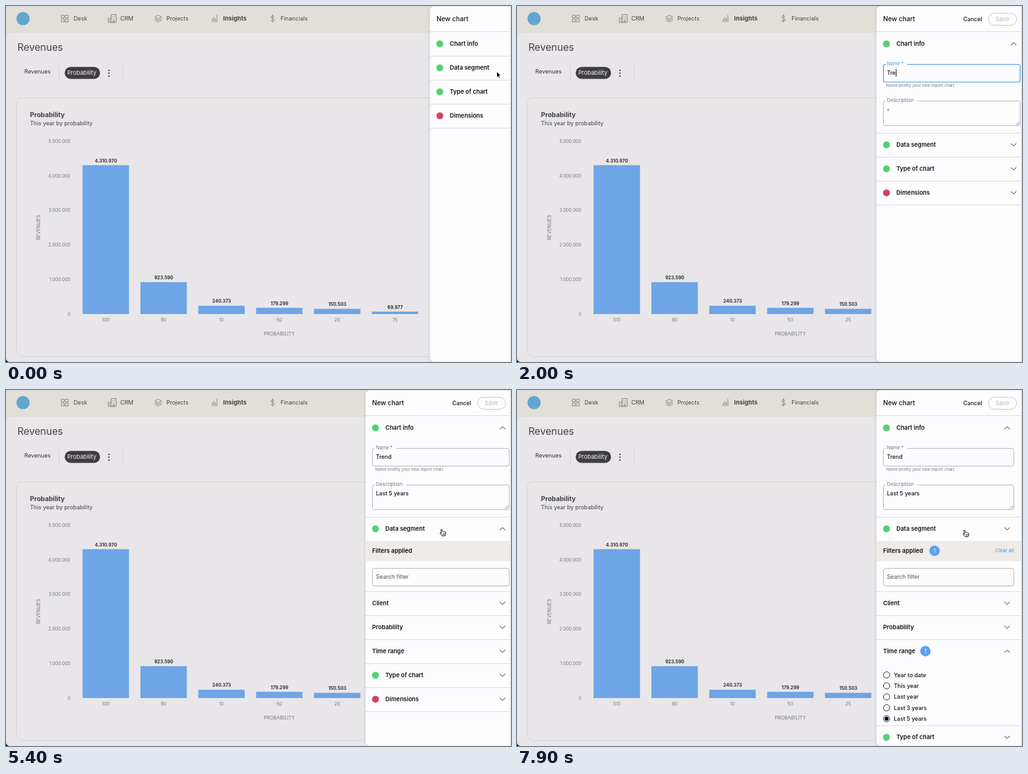
An HTML page with a canvas for the animation above (8 s loop, 800x564 px).

```html
<!DOCTYPE html>
<html lang="en">
<head>
<meta charset="utf-8">
<title>New chart</title>
<style>
  html, body { margin: 0; width: 100%; height: 100%; overflow: hidden; background: #e8e6e8; }
  canvas { display: block; }
</style>
</head>
<body>
<canvas id="stage" width="800" height="564"></canvas>
<script>
const ctx = document.getElementById('stage').getContext('2d');
const LOOP = 8000, TICK = 100;
const INK = '#111013', GREY = '#77757a', LINE = '#dddbdf', FIELD = '#b5b3b8';
const BLUE = '#3b9be8', BADGE = '#5f9fee', GREEN = '#52d272', RED = '#d2435f', PAPER = '#fdfcfe';

const clamp = v => Math.max(0, Math.min(1, v));
const ease = u => u < .5 ? 4 * u ** 3 : 1 - (2 - 2 * u) ** 3 / 2;
const tween = (t, start, length) => ease(clamp((t - start) / length));
const typed = (text, t, start, step) => text.slice(0, Math.max(0, Math.floor((t - start) / step) + 1));

// ---------- drawing helpers ----------
function text(str, x, y, size, { color = INK, weight = 400, align = 'left' } = {}) {
  ctx.font = `${weight} ${size}px Inter, sans-serif`;
  ctx.textAlign = align;
  ctx.fillStyle = color;
  ctx.fillText(str, x, y + size * .36);
}

function rect(x, y, w, h, color) {
  ctx.fillStyle = color;
  ctx.fillRect(x, y, w, h);
}

function rounded(x, y, w, h, r, { fill, stroke, width = 1 }) {
  ctx.beginPath();
  ctx.roundRect(x, y, w, h, r);
  paint(fill, stroke, width);
}

function circle(x, y, r, { fill, stroke, width = 1 }) {
  ctx.beginPath();
  ctx.arc(x, y, r, 0, 7);
  paint(fill, stroke, width);
}

function shape(d, x, y, { fill, stroke, width = 1 }) {
  const path = new Path2D(d);
  ctx.save();
  ctx.translate(x, y);
  ctx.lineJoin = ctx.lineCap = 'round';
  paint(fill, stroke, width, path);
  ctx.restore();
}

function paint(fill, stroke, width, path) {
  const args = path ? [path] : [];
  if (fill) { ctx.fillStyle = fill; ctx.fill(...args); }
  if (stroke) { ctx.strokeStyle = stroke; ctx.lineWidth = width; ctx.stroke(...args); }
}

// ---------- dimmed page ----------
const NAV = [
  ['Desk', 107, 88, 'M0 0h4.3v4.3h-4.3z M6.4 0h4.3v4.3h-4.3z M0 6.4h4.3v4.3h-4.3z M6.4 6.4h4.3v4.3h-4.3z'],
  ['CRM', 181, 162, 'M0 11.5V4.5H4.5V11.5 M4.5 11.5V-1H12.5V11.5H0 M2 7h.8 M2 9.2h.8 M7 2h.5 M9.7 2h.5 M7 4.8h.5 M9.7 4.8h.5 M7.5 11.5V8.2h2.2v3.3'],
  ['Projects', 254, 236, 'M0 2.8L5.3 0L10.6 2.8L5.3 5.6Z M0 5.4L5.3 8.2L10.6 5.4 M0 8L5.3 10.8L10.6 8'],
  ['Insights', 344, 326, 'M.8 10.5V6 M3.2 10.5V3.5 M5.6 10.5V5 M8 10.5V0'],
  ['Financials', 435, 419, 'M5.7 2.5C5.4 .5 .8 .5 .8 3C.8 5.8 5.9 4.6 5.9 7.6C5.9 10.2 .7 10.1 .4 7.9 M3.3 -.8V11.5']
];
const BARS = [[4310970, '100'], [923590, '90'], [240373, '10'], [179299, '50'], [150503, '25'], [69977, '75']];
const dotted = n => String(n).replace(/\B(?=(\d{3})+$)/g, '.');

function drawPage() {
  rect(0, 0, 800, 564, '#e2dfd9');
  rounded(-.5, 41.5, 820, 540, 8, { fill: '#e8e6e8', stroke: '#dcd9d7' });
  circle(27, 20, 10.5, { fill: '#62a5cd' });
  for (const [label, x, iconX, icon] of NAV) {
    const active = label === 'Insights';
    shape(icon, iconX, 14.5, { stroke: '#7d7b7d', width: .9 });
    text(label, x, 19.5, active ? 9.5 : 9.15, { color: '#454346', weight: active ? 700 : 400 });
  }

  text('Revenues', 18, 65.2, 15.7, { color: '#454347' });
  text('Revenues', 29, 104, 9.05, { color: '#333135' });
  rect(84, 93, 1, 25, '#d5d3d5');
  rounded(93, 96.5, 56, 19, 9.5, { fill: '#3f3d41' });
  text('Probability', 97, 105.5, 9.2, { color: '#f3f1f3' });
  for (const y of [102, 106.5, 111]) circle(163, y, 1.2, { fill: '#49474b' });
  rect(185, 93, 1, 25, '#d5d3d5');

  rounded(16.5, 145.5, 800, 410, 8, { stroke: '#d7d5d8' });
  text('Probability', 38, 172, 10.4, { color: '#434145', weight: 700 });
  text('This year by probability', 38, 186, 8.95, { color: '#434145' });
  drawChart();
  shape('M0 -6V0H6C2.5 0 0 -2.5 0 -6', 0, 564, { fill: '#000' });
}

function drawChart() {
  const base = 488, perMillion = 54.7, soft = { color: GREY };
  for (let i = 0; i <= 5; i++) text(dotted(i * 1e6), 102, base - i * perMillion, 7.15, { ...soft, align: 'right' });
  BARS.forEach(([value, label], i) => {
    const x = 121.3 + i * 91.65, top = base - value / 1e6 * perMillion;
    rect(x, top, 73.5, base - top, '#6da5e6');
    text(dotted(value), x + 37, top - 7.2, 7.2, { color: '#333135', weight: 700, align: 'center' });
    text(label, x + 36.7, 497.3, 7.1, { ...soft, align: 'center' });
  });
  text('PROBABILITY', 433, 519.5, 7.65, { ...soft, align: 'center' });
  ctx.save();
  ctx.translate(51.5, 351);
  ctx.rotate(-Math.PI / 2);
  text('REVENUES', 0, 0, 7.6, { ...soft, align: 'center' });
  ctx.restore();
}

// ---------- panel ----------
const VALUE = 8.95;

function field(y, h, { label, labelWidth, value = '', border, tint = GREY, selected, caret, right }) {
  rounded(580.5, y + .5, right - 580.5, h, 3, { stroke: border, width: border === BLUE ? 1.2 : 1 });
  if (label) {
    rect(584, y - 1, labelWidth, 3, PAPER);
    text(label, 586, y - .4, label[0] === 'N' ? 7.4 : 7.85, { color: tint });
  }
  ctx.font = `500 ${VALUE}px Inter, sans-serif`;
  ctx.textAlign = 'left';
  const width = ctx.measureText(value).width;
  if (selected) rect(586, y + 8, width, 12, '#a9cdf3');
  text(value, 586, y + 14, VALUE, { weight: 500 });
  if (caret) rect(586.3 + width, y + 8, 1, 12, INK);
}

function badge(x, y) {
  circle(x, y, 8.2, { fill: BADGE });
  text('1', x, y, 8.6, { color: '#fff', align: 'center' });
}

// Draws a collapsible section starting at y and returns where it ends.
function section(y, title, { dot, open = 0, height = 0, right, body }) {
  const mid = y + 18.3, end = y + 38 + height * open;
  if (dot) circle(585.3, mid + .6, 5.5, { fill: dot });
  text(title, dot ? 601 : 580, mid, 9.35, { weight: 600 });
  shape(opening(title) ? 'M-4 2L0 -2L4 2' : 'M-4 -2L0 2L4 -2', right - 10.5, mid + .6, { stroke: INK, width: .95 });
  if (open > 0) {
    ctx.save();
    ctx.beginPath();
    ctx.rect(569, y + 38, 232, height * open);
    ctx.clip();
    body(y + 38);
    ctx.restore();
  }
  rect(569, end, 230, 1, LINE);
  return end;
}

const OPENED = { 'Chart info': [500, Infinity], 'Data segment': [5150, 7855], 'Time range': [6180, Infinity] };
let now = 0;
const opening = title => title in OPENED && now >= OPENED[title][0] && now < OPENED[title][1];
const openness = title => tween(now, OPENED[title][0], 225) - tween(now, OPENED[title][1], 225);

function drawPanel(t, pointer) {
  const info = openness('Chart info'), data = openness('Data segment'), range = openness('Time range');
  const rangeHeight = 108, dataHeight = 194 + rangeHeight * range;
  const total = 193 + 122 * info + dataHeight * data;
  const right = total > 564 ? 787 : 797;
  const changed = t >= 1750, chosen = t >= 7150;
  const blink = (t + 200) % 1000 < 500;

  ctx.save();
  ctx.translate(102 * (1 - clamp(t / 220)) ** 2, 0);
  ctx.shadowColor = 'rgba(0,0,0,.18)';
  ctx.shadowBlur = 4;
  rounded(569.5, .5, 260, 563, [7, 0, 0, 7], { fill: PAPER });
  ctx.shadowColor = 'transparent';

  text('New chart', 580, 20.7, 10.25, { weight: 500 });
  if (changed) {
    text('Cancel', 707, 20.7, 8.95, { weight: 500 });
    rounded(747, 11.5, 44.5, 19, 9.5, { stroke: '#c9c7cb' });
    text('Save', 769, 20.7, 9.2, { color: '#b9b7bc', align: 'center' });
  } else {
    shape('M-4.7 -4.7L4.7 4.7M4.7 -4.7L-4.7 4.7', 786.5, 20.5, { stroke: INK, width: 1.1 });
  }
  rect(569, 40, 230, 1, LINE);

  let y = section(41, 'Chart info', { dot: GREEN, open: info, height: 122, right, body: top => {
    const onName = t >= 940 && t < 2720, onText = t >= 2720 && t < 5150;
    const nameTint = onName ? (t < 1100 ? '#1c2236' : BLUE) : null;
    field(top + 13, 28, {
      label: 'Name *', labelWidth: 34, right,
      value: changed ? typed('Trend', t, 1750, 110) : 'New chart',
      border: nameTint || (pointer.over === 'name' ? INK : FIELD), tint: nameTint || GREY,
      selected: t >= 1250 && !changed, caret: onName && blink && (t < 1250 || changed)
    });
    text('Name briefly your new report chart', 585, top + 46.8, 6.5, { color: GREY });
    field(top + 71, 39, {
      label: 'Description', labelWidth: 50, right,
      value: t < 3250 ? '-' : typed('Last ', t, 3250, 110) + typed('5 years', t, 3850, 110),
      border: onText ? BLUE : pointer.over === 'description' ? INK : FIELD, tint: onText ? BLUE : GREY,
      selected: t >= 2900 && t < 3250, caret: onText && blink && (t < 2900 || t >= 3250)
    });
    shape('M0 0L5 -5M3 0L5 -2', right - 6.5, top + 109, { stroke: GREY, width: .8 });
  } });

  y = section(y, 'Data segment', { dot: GREEN, open: data, height: dataHeight, right, body: top => {
    rect(569, top, 230, 32, '#eeebe8');
    text('Filters applied', 580, top + 15.5, 9.3, { weight: 600 });
    if (chosen) {
      badge(661.5, top + 15.7);
      text('Clear all', right, top + 15.5, 7.7, { color: BLUE, align: 'right' });
    }
    field(top + 43, 28, { right, border: pointer.over === 'search' ? INK : FIELD });
    text('Search filter', 586, top + 57, 9.05, { color: '#504e53' });
    rect(569, top + 80, 230, 1, LINE);
    let row = section(top + 80, 'Client', { right });
    row = section(row, 'Probability', { right });
    if (chosen) badge(647, row + 18.8);
    section(row, 'Time range', { right, open: range, height: rangeHeight, body: start => {
      ['Year to date', 'This year', 'Last year', 'Last 3 years', 'Last 5 years'].forEach((label, i) => {
        const mid = start + 18.4 + i * 17.35;
        circle(585.5, mid, 5, { stroke: '#2b292e' });
        if (i === 4 && chosen) circle(585.5, mid, 3.2, { fill: INK });
        text(label, 597, mid, VALUE, { weight: 500 });
      });
    } });
  } });

  y = section(y, 'Type of chart', { dot: GREEN, right });
  section(y, 'Dimensions', { dot: RED, right });
  ctx.restore();
  rect(798.5, 0, 1.5, 564, '#e6e4e7');
}

// ---------- pointer ----------
const PATH = [
  [0, 778, 104], [150, 778, 104], [480, 690, 64], [640, 690, 64], [900, 660.5, 104.4], [2400, 660.5, 104.4],
  [2700, 657.5, 164], [4850, 657.5, 164], [5130, 691, 225.6], [5600, 691, 225.6], [5800, 690, 412],
  [6400, 690, 412], [6800, 638, 509], [7000, 624, 521], [7300, 624, 521], [7720, 710, 227], [LOOP, 710, 227]
];
const CLICKS = [480, 920, 1150, 2700, 5130, 6160, 7120, 7760];
const FIELDS = [['name', 92, 121, 640], ['description', 150, 190, 640], ['search', 282, 311, 5300]];

function pointerAt(t) {
  const i = PATH.findIndex(([time]) => time > t) - 1;
  const [t0, x0, y0] = PATH[i], [t1, x1, y1] = PATH[i + 1];
  const u = tween(t, t0, t1 - t0), x = x0 + (x1 - x0) * u, y = y0 + (y1 - y0) * u;
  const hit = FIELDS.find(([, top, bottom, since]) => t >= since && y >= top && y <= bottom);
  return {
    x, y,
    over: hit && hit[0],
    hidden: (t >= 1750 && t < 2400) || (t >= 3250 && t < 4850),
    kind: hit ? 'beam' : t < 300 ? 'arrow' : 'hand',
    pressed: CLICKS.some(c => t >= c && t < c + 120)
  };
}

function drawPointer({ x, y, hidden, kind, pressed }) {
  if (hidden) return;
  if (pressed) circle(x, y, 10, { fill: '#fff', stroke: '#111', width: 2.2 });
  if (kind === 'beam') {
    shape('M-2 -5Q0 -5 0 -3.5Q0 -5 2 -5M0 -3.5V3.5M-2 5Q0 5 0 3.5Q0 5 2 5M-1 1H1', x, y, { stroke: '#111', width: 1.1 });
  } else if (kind === 'arrow') {
    shape('M0 0V9L2 7.2L3.6 10.4L5.1 9.7L3.6 6.6H6.3Z', x - .5, y, { fill: '#000', stroke: '#fff', width: .8 });
  } else {
    shape('M-2.6 1.2L-3.2 -4.2Q-2.6 -6 -1.5 -4.4L-.9 -1.4Q.4 -2.4 1.1 -1.1Q2.2 -1.9 2.8 -.6Q4.4 -1 4.5 .6L4.3 3L3.2 5.4H-1.4L-4.3 1.8Q-4.9 .2 -3.4 .5Z',
      x + 1.2, y, { fill: '#fff', stroke: '#111', width: 1 });
    shape('M-.2 1.4V3.8M1.3 1.4V3.8M2.8 1.4V3.8', x + 1.2, y, { stroke: '#111', width: .6 });
  }
}

function frame() {
  now = Math.floor(performance.now() % LOOP / TICK) * TICK;
  const pointer = pointerAt(now);
  drawPage();
  drawPanel(now, pointer);
  drawPointer(pointer);
  requestAnimationFrame(frame);
}
frame();
</script>
</body>
</html>
```
